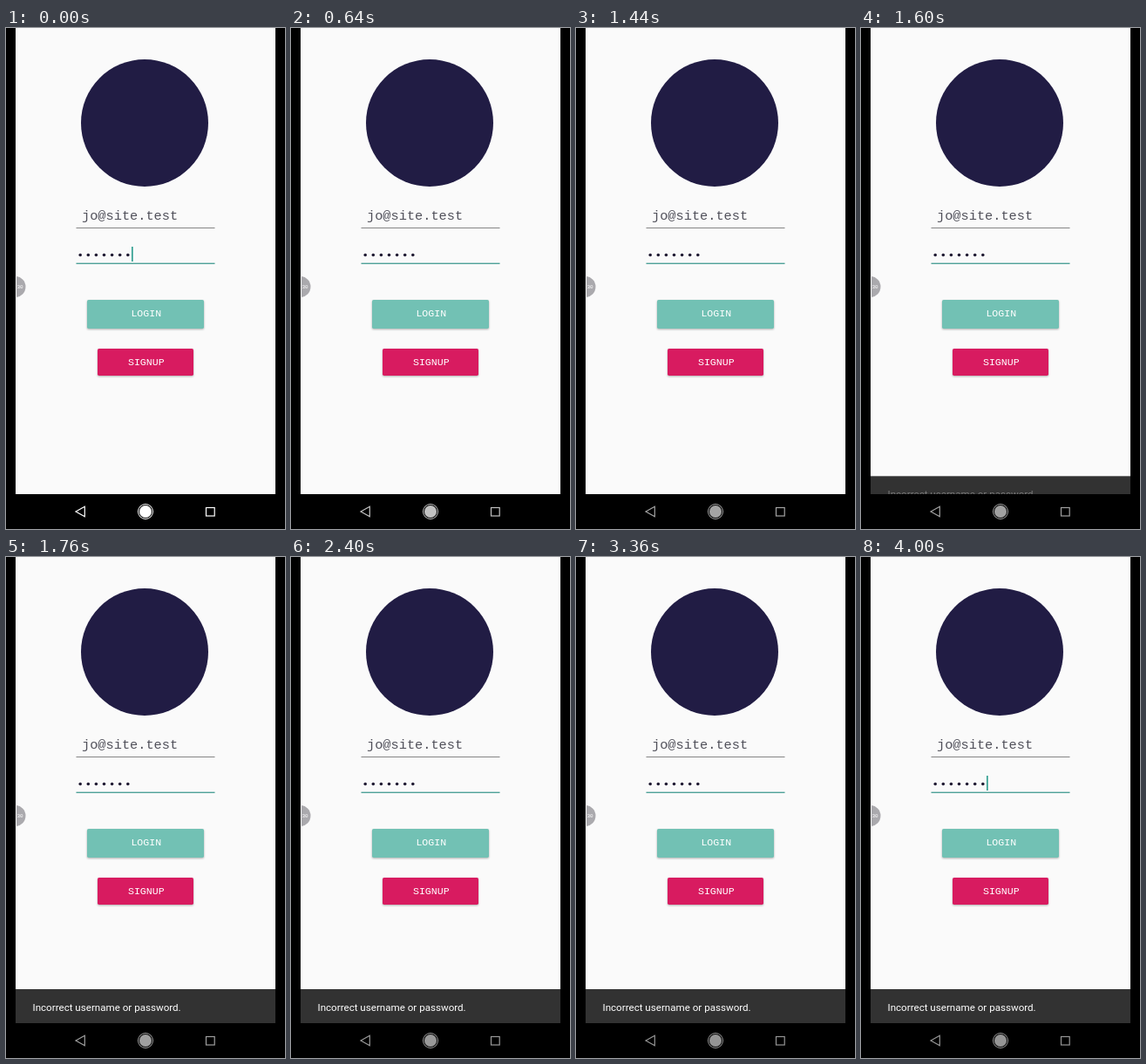
An HTML page for the animation above (4160 ms loop, 320 by 575 pixels).

```html
<!DOCTYPE html>
<html lang="en">
<head>
<meta charset="utf-8">
<title>Login</title>
<style>
  html, body { margin: 0; width: 100%; height: 100%; overflow: hidden; background: #000; }
  svg { display: block; width: 100%; height: 100%; }
  .mono { font-family: "Liberation Mono", monospace; }
  .button { font-size: 11.6px; fill: #fff; text-anchor: middle; }
  .raised { filter: drop-shadow(0 1px 1px rgba(0, 0, 0, .3)); }
</style>
</head>
<body>
<svg viewBox="0 0 320 575">
  <defs>
    <clipPath id="screen"><rect x="11" width="298" height="535"/></clipPath>
    <clipPath id="badge"><rect x="12" y="284" width="12" height="26"/></clipPath>
  </defs>
  <rect width="320" height="575"/>
  <g clip-path="url(#screen)">
    <rect x="11" width="298" height="535" fill="#fafafa"/>
    <circle cx="159" cy="109" r="73" fill="#211c44"/>

    <text class="mono" x="87" y="219.5" font-size="15.3" fill="#50505a">jo@site.test</text>
    <rect x="80.5" y="229" width="159" height="1" fill="#858585"/>
    <g id="dots" fill="#211c34"></g>
    <rect x="80.5" y="269.6" width="159" height="1.4" fill="#4fa198"/>
    <rect id="cursor" x="144" y="251" width="1.7" height="17" fill="#35a092"/>

    <rect class="raised" x="93" y="312" width="134" height="33" rx="1.7" fill="#72c1b4"/>
    <text class="mono button" x="160.8" y="331.2">LOGIN</text>
    <rect class="raised" x="105" y="368" width="110" height="31" rx="1.7" fill="#d81b60"/>
    <text class="mono button" x="160.8" y="386.6">SIGNUP</text>

    <g clip-path="url(#badge)">
      <circle cx="10.5" cy="297" r="12" fill="#aaa9ad"/>
      <text class="mono" x="12.5" y="299" font-size="6" fill="#fff">30</text>
    </g>

    <g id="snackbar">
      <rect x="11" y="496" width="298" height="39" fill="#323232"/>
      <text id="message" x="30.5" y="520.5" font-family="Roboto, sans-serif" font-size="11.6" fill="#fff">Incorrect username or password.</text>
    </g>
  </g>

  <g id="nav" fill="none" stroke="currentColor" stroke-width="1.2">
    <path d="M80 555 L90.3 549.3 V560.7 Z"/>
    <circle cx="160" cy="555" r="8.5" stroke-width="1"/>
    <circle cx="160" cy="555" r="7" fill="currentColor" stroke="none"/>
    <rect x="229.5" y="550.5" width="9.7" height="9.5"/>
  </g>
</svg>
<script>
  const LOOP = 4160;
  const SNACK_START = 1600;
  const steps = [...Array.from({ length: 13 }, (_, i) => i * 160), 2400, 2880, 3360, 4000];
  const [dots, cursor, snackbar, message, nav] =
    ["dots", "cursor", "snackbar", "message", "nav"].map(id => document.getElementById(id));

  dots.innerHTML = Array.from({ length: 7 }, (_, i) =>
    `<circle cx="${85.2 + i * 9.1}" cy="260.5" r="1.8"/>`).join("");

  function render(time) {
    const t = steps.findLast(start => start <= time);
    cursor.setAttribute("opacity", Math.floor(t / 480) % 2 ? 0 : 1);

    // The bar slides up from the bottom while its message fades in.
    const shown = t < SNACK_START ? 0 : Math.min(1, (t - SNACK_START + 130) / 250);
    const eased = shown * shown * (3 - 2 * shown);
    snackbar.setAttribute("transform", `translate(0 ${39 * (1 - eased)})`);
    message.setAttribute("opacity", Math.max(0, (shown - .28) / .72));

    const grey = Math.round(148 + 107 * Math.exp(-t / 760));
    nav.style.color = `rgb(${grey}, ${grey}, ${grey})`;
  }

  function tick() {
    render(performance.now() % LOOP);
    requestAnimationFrame(tick);
  }
  tick();
</script>
</body>
</html>
```
